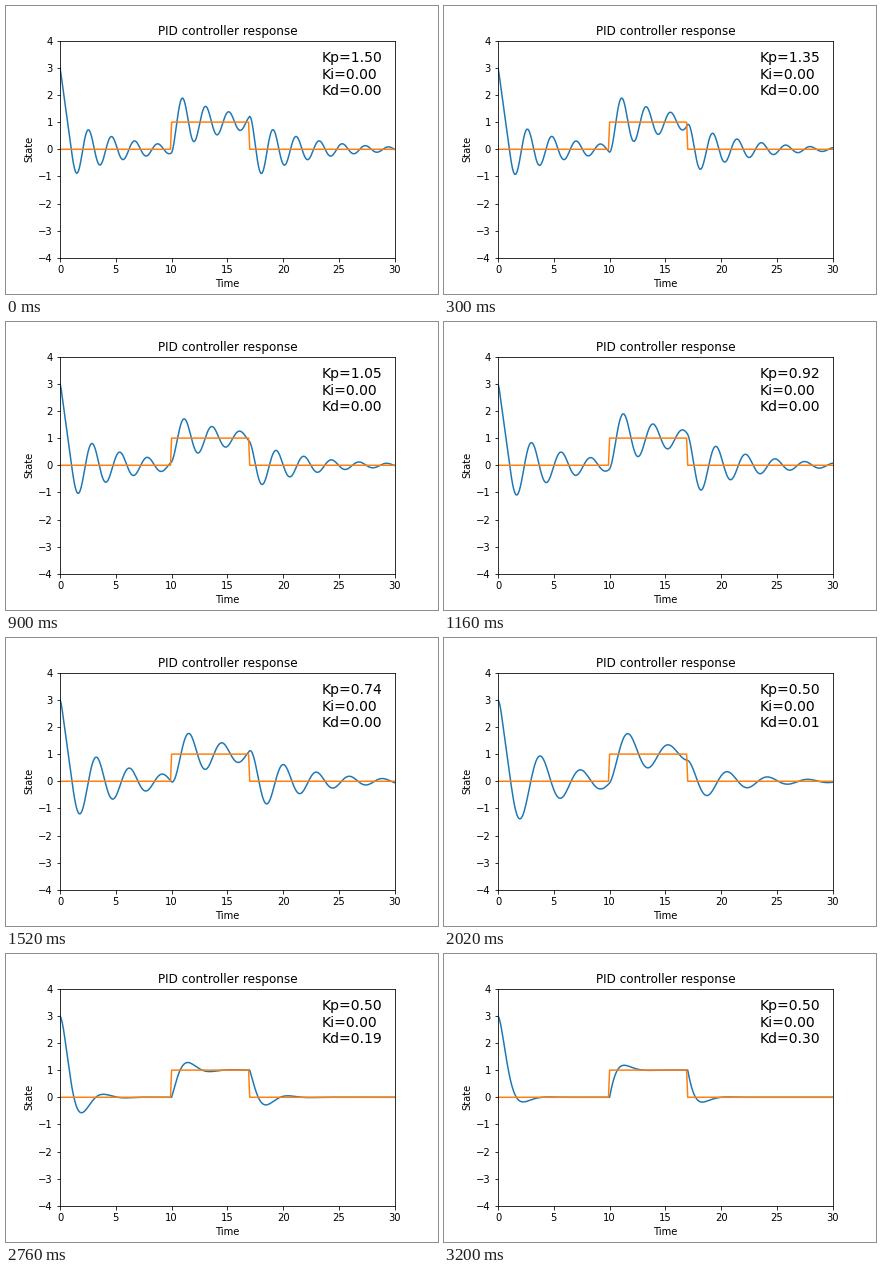
Recreate the animation shown at these times as a matplotlib script. Size 432 by 288 pixels, loop 5000 ms.

```python
import matplotlib.pyplot as plt
import numpy as np
from matplotlib.animation import FuncAnimation

DPI = 72
FRAMES, INTERVAL = 250, 20
DT = 0.1
STEPS = 301
GAIN, DRAG, MAX_SPEED = 6.0, 0.4, 3.0

time = np.arange(STEPS) * DT
target = np.zeros(STEPS)
target[100:170] = 1.0


def gains(frame):
    """Lower Kp first, then raise Kd, then hold."""
    kp = 1.5 - 0.01 * min(frame, 100)
    kd = 0.005 * min(max(frame - 100, 0), 60)
    return kp, 0.0, kd


def simulate(kp, ki, kd):
    state = np.empty(STEPS)
    x, speed, total = 3.0, 0.0, 0.0
    last_error = target[0] - x
    for i in range(STEPS):
        state[i] = x
        error = target[i] - x
        total += error * DT
        control = kp * error + ki * total + kd * (error - last_error) / DT
        last_error = error
        speed += (GAIN * control - DRAG * speed) * DT
        speed = min(max(speed, -MAX_SPEED), MAX_SPEED)
        x += speed * DT
    return state


plt.rcParams["font.family"] = "DejaVu Sans"
fig = plt.figure(figsize=(432 / DPI, 288 / DPI), dpi=DPI, facecolor="white")
ax = fig.add_axes([0.125, 0.125, 0.775, 0.755])
ax.set(xlim=(0, 30), ylim=(-4, 4), xlabel="Time", ylabel="State")
ax.set_title("PID controller response", fontsize=12)

response, = ax.plot([], [], color="#1f77b4", lw=1.5)
ax.plot(time, target, color="#ff7f0e", lw=1.5)
label = ax.text(0.78, 0.95, "", transform=ax.transAxes, fontsize=14, va="top")


def update(frame):
    kp, ki, kd = gains(frame)
    response.set_data(time, simulate(kp, ki, kd))
    label.set_text(f"Kp={kp:.2f}\nKi={ki:.2f}\nKd={kd:.2f}")
    return response, label


anim = FuncAnimation(fig, update, frames=FRAMES, interval=INTERVAL,
                     init_func=lambda: update(0), repeat=True, repeat_delay=0)
plt.show()
```
